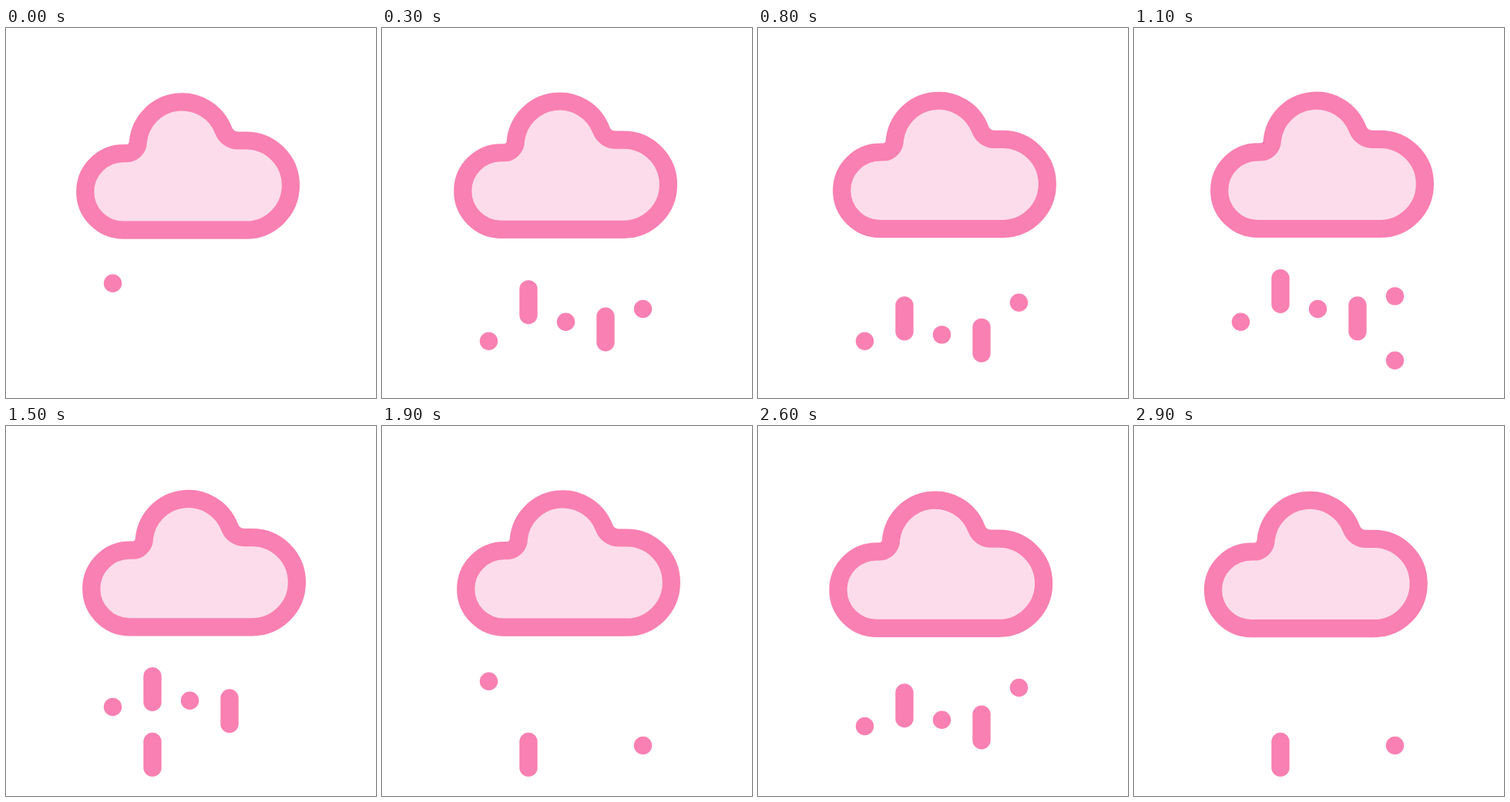
An HTML page for the animation above (3 s loop, 480 by 480 pixels).

```html
<!DOCTYPE html>
<html lang="en">
<head>
<meta charset="utf-8">
<title>Rain cloud</title>
<style>
  html, body { margin: 0; width: 100%; height: 100%; overflow: hidden; background: #fff; }
  svg { display: block; width: 100%; height: 100%; }
</style>
</head>
<body>
<svg viewBox="0 0 480 480">
  <g id="rain" stroke="#f980b2" stroke-width="23.4" stroke-linecap="round"></g>
  <path id="cloud" fill="#fcdceb" stroke="#f980b2" stroke-width="23.2" stroke-linejoin="round"
    d="M152.5 262.2A49.8 49.8 0 0 1 152.5 162.6H156A15 15 0 0 0 171.3 147.5
       A57.5 57.5 0 0 1 282.3 133.1A20 20 0 0 0 301 146H311.3
       A58.1 58.1 0 0 1 311.3 262.2Z"/>
</svg>
<script>
const LOOP = 3000, STEP = 100, TICKS = 90;

// Drops fall a fixed distance per tick (30 ticks a second)
const DOT = { y: 322.9, half: 0.01, speed: 25 / 3, life: 13 };
const BAR = { y: 341.5, half: 16.8, speed: 7.07, life: 12 };
const columns = [
  { x: 138.5, kind: DOT, starts: [-1, 14, 26, 40, 56, 70] },
  { x: 190, kind: BAR, starts: [7, 19, 33, 45, 63, 75] },
  { x: 238.5, kind: DOT, starts: [2, 15, 28, 41, 58, 71] },
  { x: 290, kind: BAR, starts: [2, 15, 28, 41, 58, 71], firstLife: 13 },
  { x: 338.5, kind: DOT, starts: [4, 20, 30, 46, 60, 76] }
];

// Cloud drift: time, x, y
const drift = [
  [0, 0, 0], [500, 3.5, -1.3], [1100, 8, -1.7], [1500, 8, -1.4],
  [1900, 6, -1], [2300, 3, -0.2], [2900, -0.2, 0.4]
];

const rain = document.getElementById('rain');
const cloud = document.getElementById('cloud');

const drops = columns.flatMap(({ x, kind, starts, firstLife }) =>
  starts.map((start, i) => {
    const el = document.createElementNS('http://www.w3.org/2000/svg', 'line');
    el.setAttribute('x1', x);
    el.setAttribute('x2', x);
    rain.append(el);
    return { el, kind, start, life: i === 0 && firstLife || kind.life };
  }));

// Knot of the periodic drift curve, for any index
function knot(i) {
  const n = drift.length, turn = Math.floor(i / n);
  const [t, x, y] = drift[i - turn * n];
  return [t + turn * LOOP, x, y];
}

function driftAt(t, axis) {
  let i = drift.length - 1;
  while (drift[i][0] > t) i--;
  const [p, a, b, q] = [i - 1, i, i + 1, i + 2].map(knot);
  const span = b[0] - a[0], u = (t - a[0]) / span;
  const slope = (k, m) => (m[axis] - k[axis]) / (m[0] - k[0]) * span;
  const u2 = u * u, u3 = u2 * u;
  return (2 * u3 - 3 * u2 + 1) * a[axis] + (u3 - 2 * u2 + u) * slope(p, b)
       + (3 * u2 - 2 * u3) * b[axis] + (u3 - u2) * slope(a, q);
}

function draw(ms) {
  const t = Math.floor((ms % LOOP) / STEP) * STEP;
  const tick = Math.round(t * TICKS / LOOP);
  cloud.setAttribute('transform', `translate(${driftAt(t, 1)} ${driftAt(t, 2)})`);
  for (const { el, kind, start, life } of drops) {
    const age = (tick - start + TICKS) % TICKS;
    const y = kind.y + age * kind.speed;
    el.setAttribute('visibility', age <= life ? 'visible' : 'hidden');
    el.setAttribute('y1', y - kind.half);
    el.setAttribute('y2', y + kind.half);
  }
}

function loop(now) {
  draw(now);
  requestAnimationFrame(loop);
}

draw(0);
requestAnimationFrame(loop);
</script>
</body>
</html>
```
